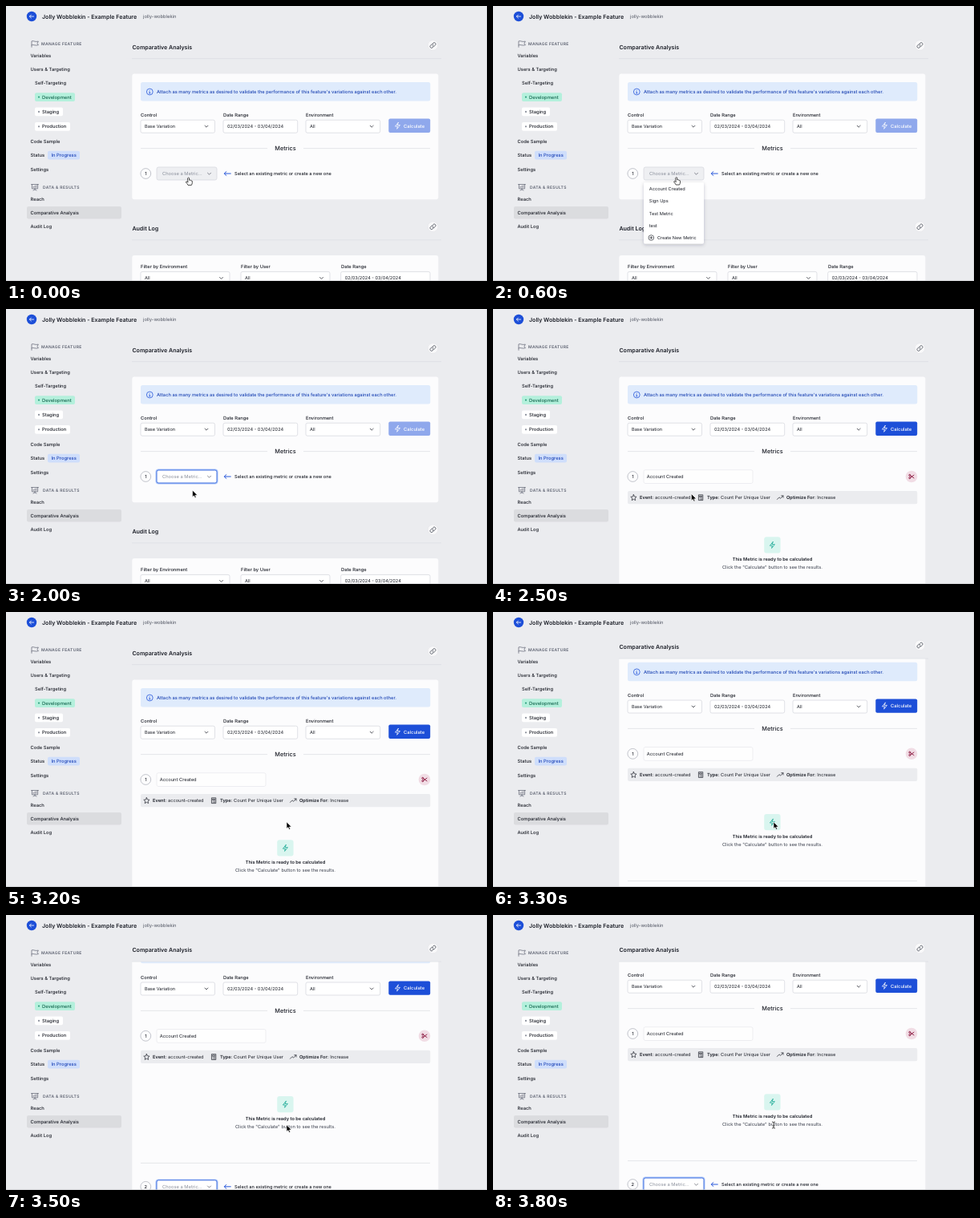
An HTML page that plays this animation: 600x343 px, repeating every 3.9 s.

```html
<!DOCTYPE html>
<html lang="en">
<head>
<meta charset="utf-8">
<title>Comparative Analysis</title>
<style>
  html, body { margin: 0; width: 100%; height: 100%; overflow: hidden; background: #ebecef; }
  svg { display: block; width: 100%; height: 100%; }
  text { font-family: Inter, sans-serif; text-rendering: geometricPrecision; white-space: pre; }
</style>
</head>
<body>
<svg id="stage" viewBox="0 0 600 343">
  <defs>
    <filter id="soft" x="-20%" y="-20%" width="140%" height="150%">
      <feDropShadow dx="0" dy="1.5" stdDeviation="2" flood-color="#1a2030" flood-opacity=".22"/>
    </filter>
  </defs>
</svg>
<script>
const LOOP = 3900, STEP = 100, GROW = 188, SCROLL = 61, STICKY = 7.5;
const BG = '#ebecef', CARD = '#fcfcfd', INK = '#1b1e27', GRAY = '#5c6170', BLUE = '#1d4fd8', EDGE = '#d3d5db';

const text = (x, y, s, o = {}) => {
  const { size = 5.65, weight = 400, fill = INK, anchor = 'start', gap = 0 } = o;
  return `<text x="${x}" y="${y + size * 0.36}" font-size="${size}" font-weight="${weight}" fill="${fill}" text-anchor="${anchor}" letter-spacing="${gap}">${s}</text>`;
};
const rect = (x, y, w, h, r, fill, more = '') =>
  `<rect x="${x}" y="${y}" width="${w}" height="${h}" rx="${r}" fill="${fill}" ${more}/>`;
const line = (x1, x2, y, color = '#dcdde2') =>
  `<path d="M${x1} ${y}H${x2}" stroke="${color}" stroke-width=".7"/>`;
const icon = (x, y, d, color = INK, w = 0.7, fill = 'none') =>
  `<path transform="translate(${x} ${y})" d="${d}" stroke="${color}" stroke-width="${w}" fill="${fill}" stroke-linecap="round" stroke-linejoin="round"/>`;
const group = (id, body, more = '') => `<g id="${id}" ${more}>${body}</g>`;

const CHEVRON = 'M-2 -1L0 1L2 -1';
const LEFT = 'M4 0H-4M-1.5 -2.4L-4 0L-1.5 2.4';
const BOLT = 'M.8 -4L-3 .8H0L-.8 4L3 -.8H0Z';
const LINK = 'M-.7 .7A1.8 1.8 0 0 0 1.9 .9L3 -.2A1.8 1.8 0 0 0 .4 -2.8L-.2 -2.2M.7 -.7A1.8 1.8 0 0 0 -1.9 -.9L-3 .2A1.8 1.8 0 0 0 -.4 2.8L.2 2.2';
const STAR = 'M0 -3.6L1.1 -1.2L3.6 -.9L1.7 .8L2.2 3.4L0 2.1L-2.2 3.4L-1.7 .8L-3.6 -.9L-1.1 -1.2Z';
const CALC = 'M-2.5 -3.4H2.5V3.4H-2.5ZM-1.3 -2H1.3V-.8H-1.3ZM-1.2 .8H-1.1M0 .8H.1M1.2 .8H1.3M-1.2 2.1H-1.1M0 2.1H.1M1.2 2.1H1.3';
const TREND = 'M-3.8 2.2L-1.3 -.4L.3 1.1L3.6 -2.2M1.4 -2.3H3.7V0';
const FLAG = 'M-4 4V-3.4C-2 -4.6 0 -2 4.4 -3.2L3 -.8L4.4 1.4C0 2.6 -2 .2 -4 1.4';
const BOARD = 'M-4.4 -3.5H4.4M-3.6 -3.5V1.8H3.6V-3.5M0 1.8V3M-2 4L0 2.8L2 4M-1.8 .3V-.8M0 .3V-1.6M1.8 .3V-2.2';
const SCISSORS = 'M-1.2 -1.1L3 1.8M-1.2 1.1L3 -1.8M-1.2 -1.7A1 1 0 1 1 -3.2 -1.7A1 1 0 1 1 -1.2 -1.7M-1.2 1.7A1 1 0 1 1 -3.2 1.7A1 1 0 1 1 -1.2 1.7';

const select = (x, w, y, s, chevron = true) =>
  rect(x, y - 8, w, 16, 2, '#fff', `stroke="${EDGE}" stroke-width=".7"`) +
  text(x + 5, y, s) + (chevron ? icon(x + w - 10.5, y, CHEVRON) : '');
const label = (x, y, s) => text(x, y, s, { size: 5.75, weight: 500 });
const heading = (y, s) => text(157.4, y, s, { size: 7.08, weight: 600 });
const linkButton = y => `<circle cx="532.5" cy="${y}" r="6.3" fill="#f9f9fa" stroke="#e0e1e5" stroke-width=".5"/>` +
  icon(532.5, y, LINK, '#3d424e', 0.75);
const pill = (y, w, s, fill, ink, dot) =>
  rect(36, y - 5.4, w, 10.8, 2, fill) + `<circle cx="41" cy="${y}" r="1.1" fill="${dot}"/>` +
  text(45, y, s, { size: 5.8, weight: 500, fill: ink });

function sidebar() {
  const item = ([x, y, s]) => text(x, y, s, { size: 5.8, weight: 500 });
  const section = (x, y, s) => text(x, y, s, { size: 5, weight: 600, fill: GRAY, gap: 0.34 });
  return rect(26, 250, 118, 15.5, 2, '#dbdcdf') +
    icon(36, 47.3, FLAG, GRAY) + section(44, 47.3, 'MANAGE FEATURE') +
    icon(36, 226, BOARD, GRAY) + section(46, 226.3, 'DATA &amp; RESULTS') +
    [[30.5, 62, 'Variables'], [30.5, 79, 'Users &amp; Targeting'], [36, 96, 'Self-Targeting'],
     [30.5, 168.5, 'Code Sample'], [30.5, 186, 'Status'], [30.5, 203.7, 'Settings'],
     [30.5, 241, 'Reach'], [30.5, 258, 'Comparative Analysis'], [30.5, 275, 'Audit Log']].map(item).join('') +
    pill(113.6, 50, 'Development', '#b4f0dc', '#14664f', '#2f9f7f') +
    pill(131.9, 35, 'Staging', '#fff', INK, '#8b909b') +
    pill(150.3, 44, 'Production', '#fff', INK, '#8b909b') +
    rect(52, 180.7, 40, 10.8, 2, '#cfdefb') +
    text(56.5, 186.1, 'In Progress', { size: 5.8, weight: 500, fill: '#1e45b8' });
}

const header = () =>
  `<circle cx="32" cy="13" r="6.2" fill="${BLUE}"/>` + icon(32, 13, 'M2.6 0H-2.6M-.6 -2L-2.6 0L-.6 2', '#fff', 0.8) +
  text(45, 13, 'Jolly Wobblekin - Example Feature', { size: 7.08, weight: 600 }) +
  text(171, 13, 'jolly-wobblekin', { size: 5.8, fill: '#4c515e' });

const form = () =>
  rect(168, 95, 361.3, 23.5, 2.5, '#dfebfc') +
  `<circle cx="179.3" cy="107" r="3.9" fill="none" stroke="${BLUE}" stroke-width=".75"/>` +
  icon(179.3, 107, 'M0 -1.7V-1.6M-.5 -.2H0V1.8M-.7 1.8H.7', BLUE) +
  text(188, 107, "Attach as many metrics as desired to validate the performance of this feature's variations against each other.",
    { size: 5.75, weight: 500, fill: '#1f46b4' }) +
  label(168, 136.4, 'Control') + label(271, 136.4, 'Date Range') + label(374, 136.4, 'Environment') +
  select(168, 92.5, 150.2, 'Base Variation') +
  select(271, 92.7, 150.2, '02/03/2024 - 03/04/2024', false) +
  select(374, 92.7, 150.2, 'All') +
  rect(477.3, 140.6, 51.9, 17.4, 2, BLUE, 'id="calc"') + icon(488.5, 149.3, BOLT, '#fff', 0.75) +
  text(496, 149.4, 'Calculate', { size: 5.85, weight: 500, fill: '#fff' }) +
  line(168, 326, 177.6) + line(371, 529, 177.6) +
  text(348.5, 177.6, 'Metrics', { size: 7.3, weight: 500, anchor: 'middle' });

const badge = n =>
  `<circle cx="174.3" cy="209" r="6.4" fill="${CARD}" stroke="#a9adb7" stroke-width=".7"/>` +
  text(174.3, 209, n, { anchor: 'middle', weight: 500 });

const picker = () =>
  group('badge1', badge(1)) + group('badge2', badge(2)) +
  rect(187.2, 200.3, 76.6, 17.4, 3, 'none', 'id="glow" stroke="#a9c4fa" stroke-width="1.4"') +
  rect(188, 201, 75, 16, 2.2, '#fff', 'id="box"') +
  text(195, 209.1, 'Choose a Metric...', { size: 5.75, fill: '#8b909c' }) + icon(253.5, 209.2, CHEVRON, '#4f5461') +
  icon(276.3, 209, LEFT, BLUE, 0.95) +
  text(285, 209.1, 'Select an existing metric or create a new one', { weight: 500 });

function metric() {
  const pair = (x, k, v) => text(x, 235.2, `<tspan font-weight="600">${k}:</tspan> ${v}`, { size: 5.7 });
  return badge(1) +
    rect(188, 200.7, 136, 16.8, 2, '#fefefe', 'stroke="#e4e5e9" stroke-width=".6"') + text(191.7, 209.1, 'Account Created', { size: 5.75 }) +
    '<circle cx="522" cy="209" r="7.3" fill="#f1dde5"/>' + icon(522, 209, SCISSORS, '#8f1f45', 0.95) +
    rect(168, 227, 361.3, 16.3, 2, '#ebecef') +
    icon(175.4, 235.2, STAR) + pair(183, 'Event', 'account-created') +
    icon(259.3, 235.2, CALC) + pair(267, 'Type', 'Count Per Unique User') +
    icon(358.3, 235.2, TREND) + pair(366, 'Optimize For', 'Increase') +
    rect(338.2, 284.3, 20.4, 20.2, 3, '#d9f5ef') + icon(348.4, 294.4, BOLT, '#20ac98', 0.85) +
    text(348.5, 312.2, 'This Metric is ready to be calculated', { size: 5.7, weight: 600, anchor: 'middle' }) +
    text(348.4, 322.3, 'Click the "Calculate" button to see the results.', { size: 5.75, fill: '#3c414e', anchor: 'middle' }) +
    line(168, 529, 367.6);
}

const menu = () =>
  rect(188, 220, 75, 76.5, 2, '#fff', 'filter="url(#soft)"') +
  rect(188, 220.5, 75, 15.5, 1.5, '#eceef1', 'id="hover"') +
  ['Account Created', 'Sign Ups', 'Test Metric', 'test'].map((s, i) => text(194.8, 228.2 + i * 15.15, s)).join('') +
  `<circle cx="197.3" cy="289" r="3.3" fill="none" stroke="${INK}" stroke-width=".65"/>` +
  icon(197.3, 289, 'M-1.5 0H1.5M0 -1.5V1.5') + text(205, 289, 'Create New Metric', { size: 5.5 });

const audit = () =>
  heading(277.4, 'Audit Log') + linkButton(275.3) + line(157, 543, 291.8) +
  rect(157.3, 311, 382, 120, 3, CARD) +
  label(168, 325.4, 'Filter by Environment') + label(293, 325.4, 'Filter by User') + label(418, 325.4, 'Date Range') +
  select(168, 111, 339.4, 'All') + select(293, 111, 339.4, 'All') +
  select(417.7, 111.3, 339.4, '02/03/2024 - 03/04/2024', false);

const cursors = () =>
  group('arrow', icon(0, 0, 'M0 0V8.2L1.9 6.5L3.2 9.3L4.6 8.7L3.4 6H6Z', '#fff', 0.6, '#000')) +
  group('hand', icon(0, 0, 'M-.9 .6Q0 -.6 .9 .6V3.2Q1.7 2.7 2.3 3.5Q3.1 3 3.6 3.9Q4.6 3.6 4.7 4.8V6.6Q4.6 8 3.8 9.4H-.6Q-1.4 7.6 -3.2 5.8Q-3 4.5 -1.6 5.1L-.9 5.8Z', '#111', 0.75, '#fff')) +
  group('beam', icon(0, 0, 'M-1.6 -4Q-.2 -4 0 -3.1Q.2 -4 1.6 -4M0 -3.1V3.1M-1.6 4Q-.2 4 0 3.1Q.2 4 1.6 4M-.8 1H.8', '#fff', 1.5) +
    icon(0, 0, 'M-1.6 -4Q-.2 -4 0 -3.1Q.2 -4 1.6 -4M0 -3.1V3.1M-1.6 4Q-.2 4 0 3.1Q.2 4 1.6 4M-.8 1H.8', '#111', 0.75));

const stage = document.getElementById('stage');
stage.insertAdjacentHTML('beforeend',
  rect(0, 0, 600, 343, 0, BG) +
  group('page', rect(157.3, 84.5, 382, 156.7, 3, CARD, 'id="card"') + form() +
    group('audit', audit()) + group('metric', metric()) + group('picker', picker()) + group('menu', menu())) +
  group('sticky', rect(150, 0, 400, 65.5, 0, BG) + heading(51.3, 'Comparative Analysis') + linkButton(49) + line(157, 543, 65.6)) +
  rect(0, 0, 600, 30, 0, BG) + header() + sidebar() +
  rect(0, 342.3, 600, 0.7, 0, '#c6c7cb') + rect(599.4, 0, 0.6, 343, 0, '#d6d7da') +
  group('cursor', cursors()));

const el = {};
stage.querySelectorAll('[id]').forEach(n => el[n.id] = n);

const show = (n, on) => n.setAttribute('visibility', on ? 'visible' : 'hidden');
const move = (n, x, y) => n.setAttribute('transform', `translate(${x} ${y})`);
const phase = (t, a, b) => Math.min(1, Math.max(0, (t - a) / (b - a)));
const ease = p => p * p * (3 - 2 * p);

// Pointer stops: start, end, x, y
const stops = [[0, 0, 227.6, 214], [100, 500, 228.8, 213.6], [1000, 1350, 232.6, 226.3], [2400, 2850, 350, 262]];

function pointer(t) {
  let x = 0, y = 0;
  for (const [a, b, px, py] of stops) {
    const p = a === b ? 1 : ease(phase(t, a, b));
    x += (px - x) * p;
    y += (py - y) * p;
  }
  return [x, y];
}

function draw(ms) {
  const t = Math.floor((ms % LOOP) / STEP) * STEP;
  const open = t >= 300 && t < 1700;
  const focused = t >= 1700;
  const picked = t >= 2400;
  const typing = t >= 3600;
  const scroll = SCROLL * (1 - (1 - phase(t, 3200, 3700)) ** 3.36);
  const shift = picked ? GROW : 0;
  const [x, y] = pointer(t);

  move(el.page, 0, -scroll);
  move(el.sticky, 0, -Math.min(scroll, STICKY));
  move(el.picker, 0, shift);
  move(el.audit, 0, shift);
  el.card.setAttribute('height', 156.7 + shift);
  el.calc.setAttribute('fill', picked ? BLUE : '#8fa8ec');
  show(el.metric, picked);
  show(el.badge1, !picked);
  show(el.badge2, picked);
  show(el.glow, focused);
  el.box.setAttribute('fill', !focused && y < 218 ? '#eeeff2' : '#fff');
  el.box.setAttribute('stroke', focused ? '#2f62dc' : EDGE);
  el.box.setAttribute('stroke-width', focused ? 0.9 : 0.7);
  show(el.menu, open);
  show(el.hover, open && y > 220);
  move(el.cursor, x, y);
  show(el.hand, !focused);
  show(el.arrow, focused && !typing);
  show(el.beam, typing);
}

const start = performance.now();
function tick() {
  draw(performance.now() - start);
  requestAnimationFrame(tick);
}
tick();
</script>
</body>
</html>
```
